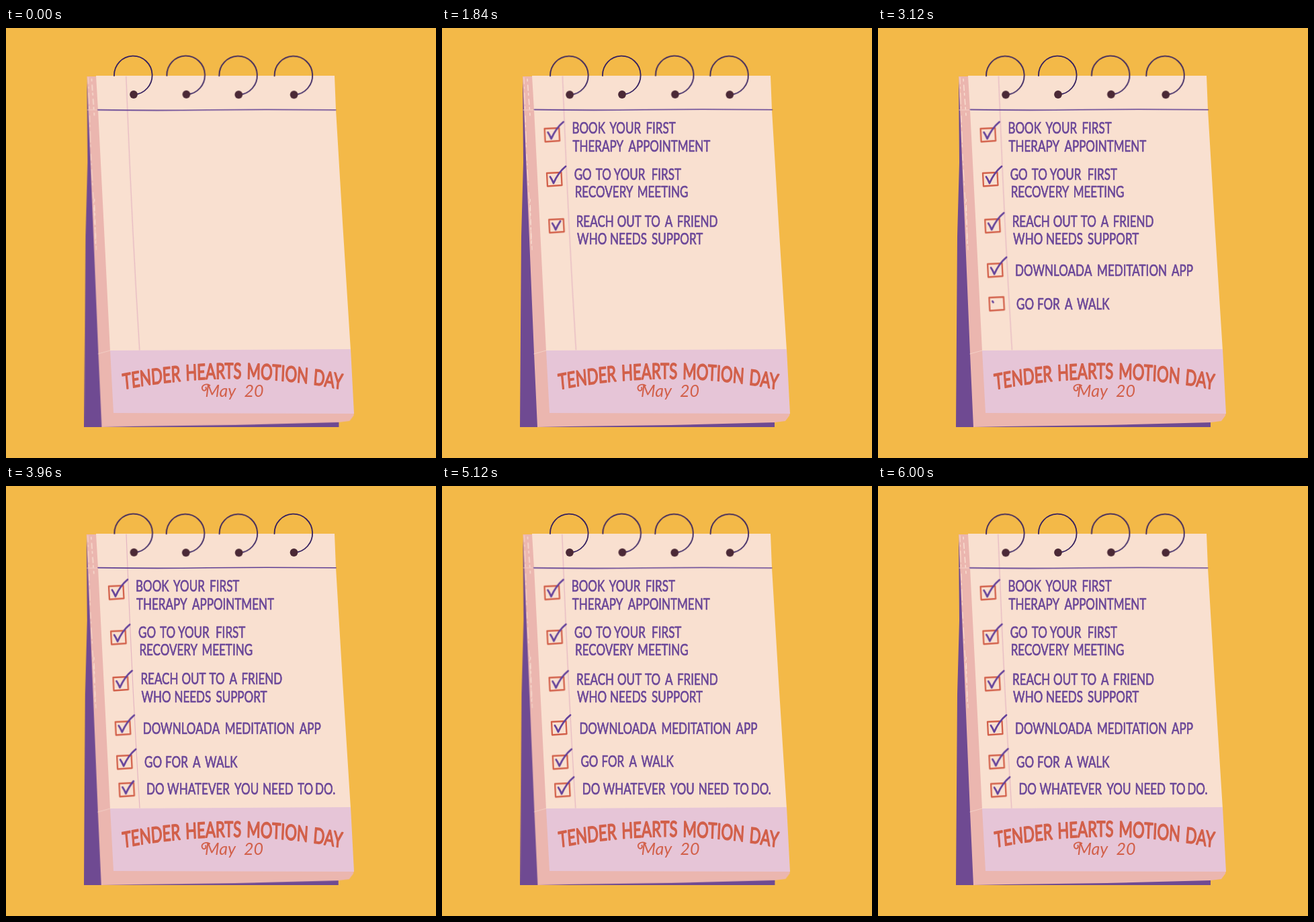
Recreate the animation shown at these times as an HTML page. Size 640x640 px, loop 6040 ms.

```html
<!DOCTYPE html>
<html lang="en">
<head>
<meta charset="utf-8">
<title>Notepad checklist</title>
<style>
  @property --t { syntax: '<number>'; inherits: true; initial-value: 0; }

  html, body { margin: 0; width: 100%; height: 100%; overflow: hidden; background: #f3b948; }
  svg { display: block; width: 100%; height: 100%; animation: clock 6040ms steps(151) infinite; }
  path { fill: none; stroke-linecap: round; stroke-linejoin: round; }
  text { font-family: Lato, "Open Sans", sans-serif; stroke-linejoin: round; }

  /* --t counts milliseconds; each item compares it with its own tick time --at */
  @keyframes clock { to { --t: 6040; } }
  .item { opacity: clamp(0, var(--t) - var(--at) + 160, 1); }
  .tick {
    stroke: #64429a; stroke-width: 2.8;
    stroke-dasharray: 1 2;
    stroke-dashoffset: calc((1 - clamp(0.03, (var(--t) - var(--at)) / 200, 1)) * 1px);
    opacity: clamp(0, var(--t) - var(--at), 1);
  }
  .box { stroke: #d2604a; stroke-width: 2.3; }
  .words { font-size: 23px; fill: #6a4698; stroke: #6a4698; stroke-width: .75; }

  .boil { animation: boil calc(6040ms / 19) step-end infinite; }
  @keyframes boil {
    0%  { transform: translate(0, 0); }
    25% { transform: translate(.4px, -.2px); }
    50% { transform: translate(-.3px, .2px); }
    75% { transform: translate(.1px, .3px); }
  }

  .ring { stroke: #35205f; stroke-width: 1.8; }
  .banner { font-size: 32px; fill: #d2604a; stroke: #d2604a; stroke-width: 1.7; word-spacing: 3px; text-anchor: middle; }
  .date { font-size: 25px; font-style: italic; fill: #d2604a; }
</style>
</head>
<body>
<svg viewBox="0 0 640 640">
  <defs><path id="arch" d="M217 543.6Q488.4 500.4 759.8 543.6"/></defs>

  <g class="boil" style="animation-delay:-80ms">
    <polygon fill="#6f4a92" points="120,74 121,200 118,310 116,594 300,594 495,594 495,580 150,560"/>
    <polygon fill="#ebb6af" points="120,72 160,72 480,560 518,572 517,577 511,585 495,587 340,591 190,593 142,594 137,484 129,290"/>
    <path d="M122 74L126 190L134 330" stroke="#f5d2c6" stroke-width="1.4" stroke-dasharray="9 5 2 7 16 4 3 11"/>
    <path d="M127 76L131 130M131 255L133 322" stroke="#f8ddd0" stroke-width="1.5" stroke-dasharray="3 6 8 4"/>
    <path d="M121 122L137 122M137 485L155 480" stroke="#f3cfc6" stroke-width="1"/>
  </g>

  <polygon fill="#f9e0d0" points="134,71 489,71 491,122 501,290 513,480 155,481 146,300 137,122"/>
  <polygon fill="#e6c5d7" points="155,480 513,478 518,574 160,573"/>

  <g class="boil" style="animation-delay:-200ms">
    <path d="M179 72L181 122Q188 300 199 479" stroke="#e4b5c1" stroke-width="1.2"/>
    <path d="M137 121.6Q220 123 300 121.8T491 121.8" stroke="#5f3f93" stroke-width="1.6"/>
  </g>

  <g id="rings"></g>
  <g id="list"></g>

  <g class="boil" style="animation-delay:-120ms">
    <text class="banner" transform="scale(.69 1)"><textPath href="#arch" startOffset="50%">TENDER HEARTS MOTION DAY</textPath></text>
    <text class="date" x="296" y="549">May</text>
    <text class="date" x="354" y="549">20</text>
    <path d="M303 532C295 528 290 534 292 538S299 539 297 535" stroke="#d2604a" stroke-width="1.9"/>
  </g>
</svg>

<script>
  const FIRST_TICK = 330, GAP = 695;
  const NS = 'http://www.w3.org/2000/svg';

  function add(parent, tag, attrs, text = '') {
    const el = document.createElementNS(NS, tag);
    for (const [key, value] of Object.entries(attrs)) el.setAttribute(key, value);
    el.textContent = text;
    return parent.appendChild(el);
  }

  const rings = document.getElementById('rings');
  [189, 267, 345.5, 427.5].forEach((x, i) => {
    const ring = add(rings, 'g', { class: 'boil', style: `animation-delay:${-i * 80}ms` });
    add(ring, 'path', { class: 'ring', d: `M${x - 28} 71A28.3 28.7 0 1 1 ${x + 2} 99` });
    add(ring, 'circle', { cx: x + 1, cy: 99, r: 5.9, fill: '#4b2936' });
  });

  // Each item: box centre, then lines as [baseline, word, left edge, ...]
  const items = [
    [163.5, 158.5,
      [157, 'BOOK', 194, 'YOUR', 250, 'FIRST', 304],
      [184, 'THERAPY', 195, 'APPOINTMENT', 278]],
    [167, 225,
      [226, 'GO', 198, 'TO', 230, 'YOUR', 257, 'FIRST', 313],
      [252, 'RECOVERY', 199, 'MEETING', 292]],
    [170.5, 294,
      [295.5, 'REACH', 201, 'OUT', 262, 'TO', 303, 'A', 333, 'FRIEND', 351],
      [322, 'WHO', 202, 'NEEDS', 251, 'SUPPORT', 313]],
    [174, 360,
      [369, 'DOWNLOAD', 205, 'A', 308, 'MEDITATION', 327, 'APP', 438]],
    [176, 410.5,
      [418.5, 'GO', 207, 'FOR', 238, 'A', 279, 'WALK', 297]],
    [179, 452,
      [459, 'DO', 210, 'WHATEVER', 241, 'YOU', 341, 'NEED', 383, 'TO', 435, 'DO.', 461]]
  ];

  const list = document.getElementById('list');
  items.forEach(([x, y, ...lines], i) => {
    const item = add(list, 'g', { class: 'item', style: `--at:${FIRST_TICK + i * GAP}` });
    const mark = add(item, 'g', { transform: `translate(${x} ${y})` });
    const hand = add(mark, 'g', { class: 'boil', style: `animation-delay:${-i * 120}ms` });
    add(hand, 'path', { class: 'box', d: 'M-11 -9L10.5 -10L11.5 9L-10 10.5Z' });
    add(hand, 'path', { class: 'tick', pathLength: 1, d: 'M-6 -3.5Q-3.5 0 -1 6Q6 -10 17 -19' });

    for (const [base, ...words] of lines) {
      const row = add(item, 'g', { class: 'boil', style: `animation-delay:${-base}ms` });
      for (let k = 0; k < words.length; k += 2) {
        const left = words[k + 1] - 1;
        add(row, 'text', { class: 'words', transform: `translate(${left} ${base}) scale(.74 1)` }, words[k]);
      }
    }
  });
</script>
</body>
</html>
```
